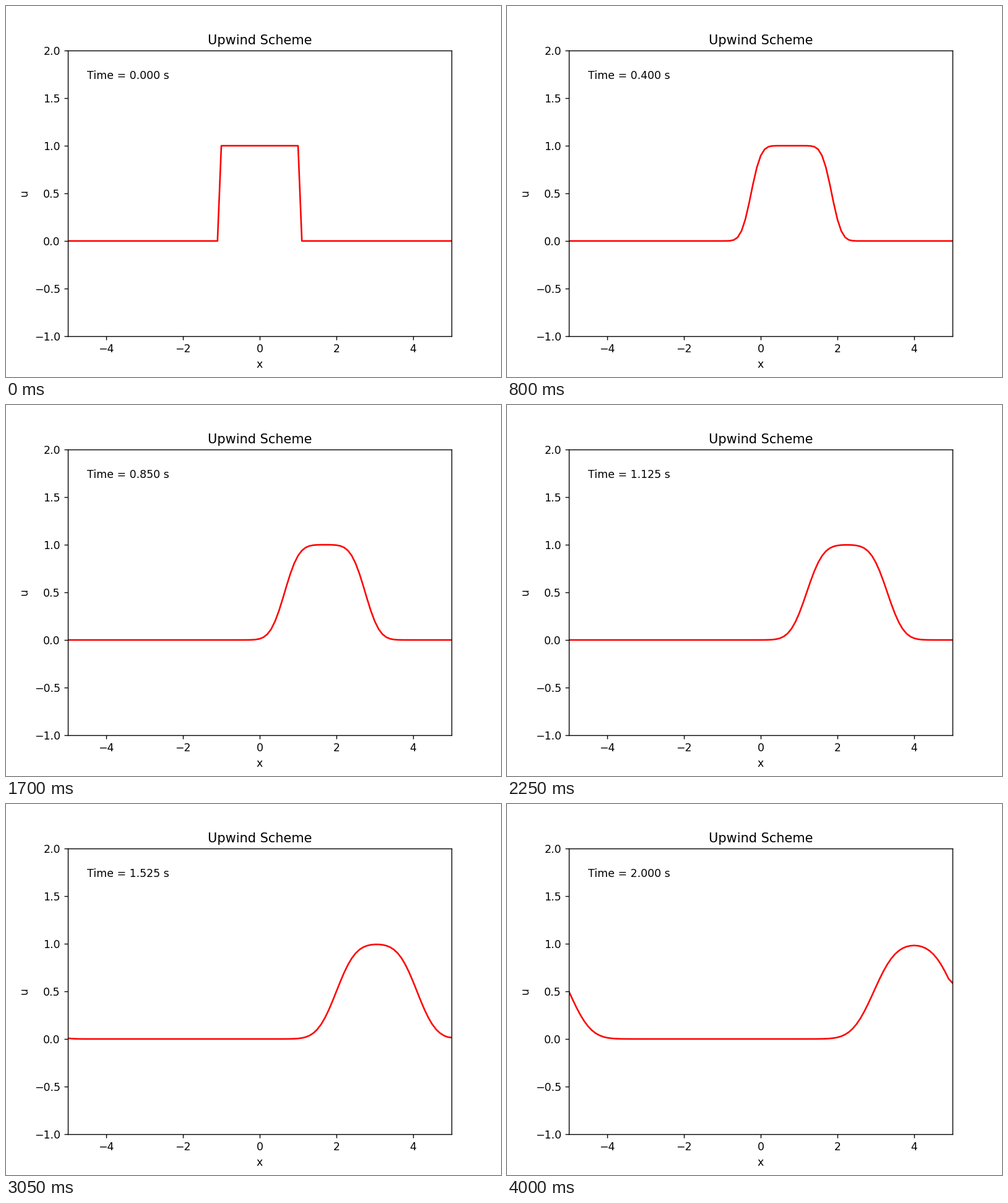
A matplotlib script for the animation above (4050 ms loop, 800 px wide and 600 px high).

```python
import numpy as np
import matplotlib.pyplot as plt
from matplotlib.animation import FuncAnimation

STEPS = 80
SPEED, DX, DT = 2.0, 0.1, 0.025
CFL = SPEED * DT / DX

x = np.linspace(-5, 5, 101)


def advance(u):
    """One upwind step on a ring; the last cell reads its updated neighbour."""
    new = u - CFL * (u - np.roll(u, 1))
    new[-1] = u[-1] - CFL * (u[-1] - new[-2])
    return new


states = [np.where(np.abs(x) < 1 + DX / 2, 1.0, 0.0)]
for _ in range(STEPS):
    states.append(advance(states[-1]))

fig, ax = plt.subplots(figsize=(6.4, 4.8), dpi=125)
ax.set(xlim=(-5, 5), ylim=(-1, 2), xlabel="x", ylabel="u",
       title="Upwind Scheme")
line, = ax.plot(x, states[0], color="red", lw=1.5)
clock = ax.text(0.05, 0.9, "", transform=ax.transAxes)


def draw(n):
    line.set_ydata(states[n])
    clock.set_text(f"Time = {n * DT:.3f} s")
    return line, clock


anim = FuncAnimation(fig, draw, frames=STEPS + 1, interval=50,
                     repeat=True, repeat_delay=0)
plt.show()
```
